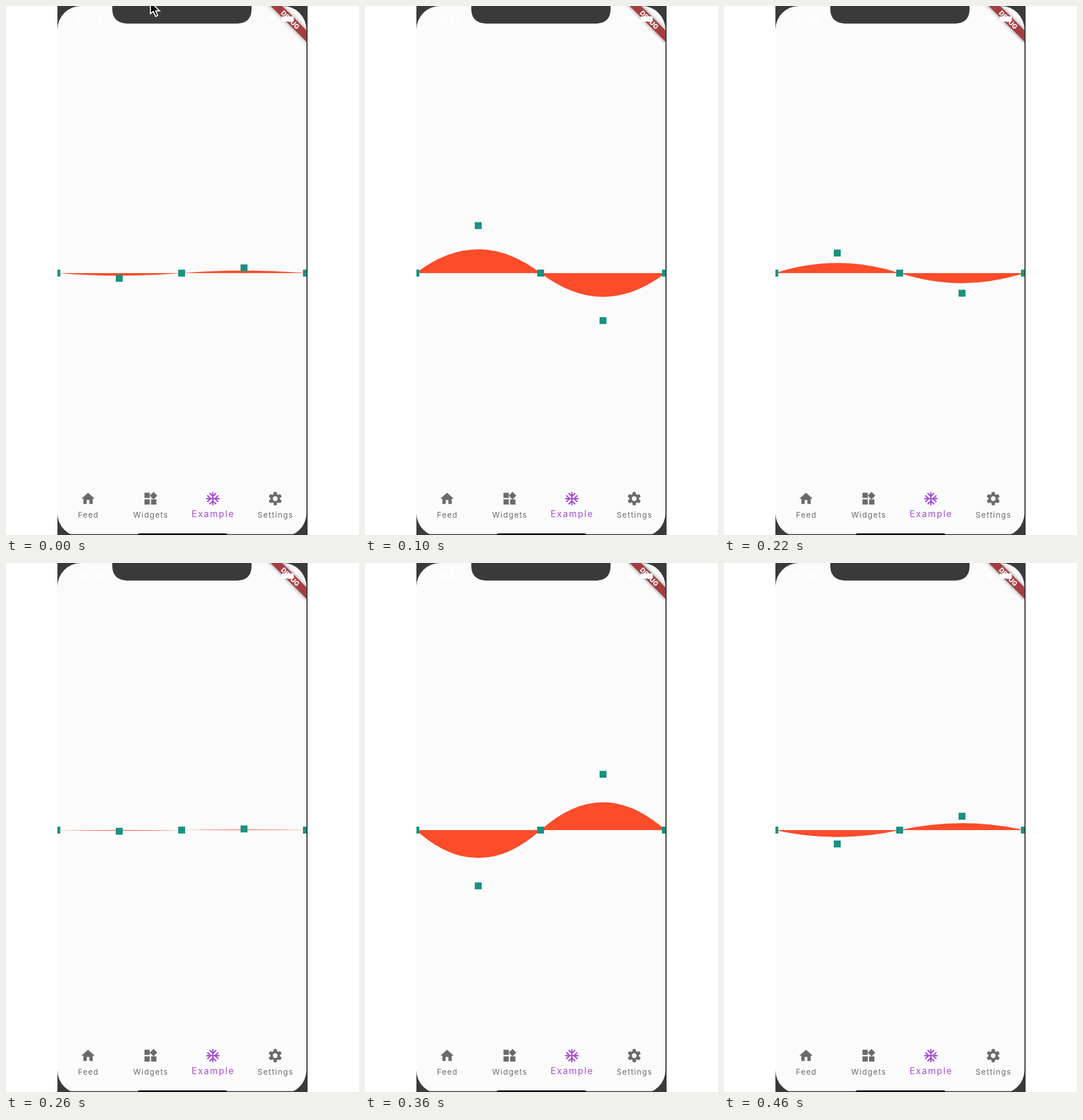
These frames come from a looping animation (611 by 917 pixels, 480 ms). An HTML page:

```html
<!DOCTYPE html>
<html lang="en">
<head>
<meta charset="utf-8">
<title>Wave</title>
<style>
  @property --a { syntax: "<number>"; inherits: true; initial-value: 0; }

  html, body { margin: 0; width: 100%; height: 100%; overflow: hidden; background: #fff; }
  svg { display: block; width: 611px; height: 917px; }
  text { font-family: Inter, "Open Sans", sans-serif; text-anchor: middle; }

  /* The small lead keeps every 20 ms step clear of rounding. */
  .wave, .cursor, .clock text { animation: swing 480ms -1ms infinite; }
  .wave path { transform: scaleY(calc(var(--a) / 100)); }
  .down { transform: translateY(calc(var(--a) * 1px)); }
  .up { transform: translateY(calc(var(--a) * -1px)); }
  .cursor { animation-name: leave; }
  .clock .before { animation-name: before; }
  .clock .after { animation-name: after; }

  @keyframes swing {
    0%      { --a: 9;    animation-timing-function: steps(3); }
    12.5%   { --a: -45;  animation-timing-function: steps(3); }
    25%     { --a: -101; animation-timing-function: steps(1); }
    29.167% { --a: -109; animation-timing-function: steps(1); }
    33.333% { --a: -90;  animation-timing-function: steps(5); }
    54.167% { --a: 2;    animation-timing-function: steps(3); }
    66.667% { --a: 60;   animation-timing-function: steps(3); }
    79.167% { --a: 115;  animation-timing-function: steps(1); }
    83.333% { --a: 98;   animation-timing-function: steps(3); }
    95.833% { --a: 24;   animation-timing-function: steps(1); }
    100%    { --a: 9; }
  }
  @keyframes leave {
    0% { opacity: 1; animation-timing-function: steps(1); }
    4.167%, 100% { opacity: 0; }
  }
  @keyframes before {
    0% { opacity: 1; animation-timing-function: steps(1); }
    62.5%, 100% { opacity: 0; }
  }
  @keyframes after {
    0% { opacity: 0; animation-timing-function: steps(1); }
    62.5%, 100% { opacity: 1; }
  }

  .clock { font-size: 17px; font-weight: 600; fill: #fff; }
  .banner rect { fill: #a53d40; filter: drop-shadow(0 0 3px rgba(0, 0, 0, .5)); }
  .banner text { font-size: 11.5px; font-weight: 800; fill: #fff; }
  .tabs { fill: #6b6b6b; font-size: 13.2px; letter-spacing: 1.4px; }
  .tabs .on { fill: #a550d2; font-size: 15.4px; letter-spacing: 1.8px; }
</style>
</head>
<body>
<svg viewBox="0 0 611 917">
  <defs>
    <clipPath id="screen"><rect x="89" y="0" width="431" height="920" rx="41"/></clipPath>
    <rect id="dot" x="-6" y="-6" width="12" height="12"/>
    <path id="arm" d="M11 12V2h2v4.17l3.24-3.24 1.42 1.41L13 9v3h-2V9L6.34 4.34l1.42-1.41L11 6.17z"/>
    <path id="tooth" d="M9.1 5.7 9.7 2.4q.1-.4.5-.4h3.6q.4 0 .5.4l.6 3.3z"/>
  </defs>

  <rect x="89" width="433" height="917" fill="#3a3a3a"/>

  <g clip-path="url(#screen)">
    <rect x="89" width="431" height="917" fill="#fbfbfb"/>

    <g class="wave" transform="translate(0 463)">
      <path d="M88 0Q196 100 304 0Q412-100 520 0z" fill="#fc4c2a"/>
      <g fill="#1a9282">
        <use href="#dot" x="88"/>
        <use href="#dot" x="304"/>
        <use href="#dot" x="520"/>
        <use class="down" href="#dot" x="196"/>
        <use class="up" href="#dot" x="412"/>
      </g>
    </g>

    <g class="banner" transform="translate(492 24) rotate(45)">
      <rect x="-80" y="-6.9" width="160" height="13.8"/>
      <text y="4.2">DEBUG</text>
    </g>

    <g class="clock">
      <text class="before" x="144" y="28.5">10:39</text>
      <text class="after" x="144" y="28.5">10:40</text>
    </g>
    <rect x="477" y="18" width="21" height="9" rx="2" fill="#fff"/>
    <path d="M452 20q8.500-7 17 0L460.500 29z" fill="#fff"/>

    <g class="tabs">
      <g transform="translate(128.200 840.200) scale(1.15)">
        <path d="M10 20v-6h4v6h5v-8h3L12 3 2 12h3v8z"/>
      </g>
      <text x="142.700" y="887">Feed</text>

      <g transform="translate(236.200 840.200) scale(1.15)">
        <path d="M13 13h8v8h-8zM3 13h8v8H3zM3 3h8v8H3zM16.660 1.690 22.320 7.340 16.660 13 11 7.340z"/>
      </g>
      <text x="250.700" y="887">Widgets</text>

      <g class="on">
        <g transform="translate(344.200 840.200) scale(1.15)">
          <use href="#arm"/>
          <use href="#arm" transform="rotate(90 12 12)"/>
          <use href="#arm" transform="rotate(180 12 12)"/>
          <use href="#arm" transform="rotate(270 12 12)"/>
        </g>
        <text x="358.500" y="886">Example</text>
      </g>

      <g transform="translate(452.200 840.200) scale(1.15)">
        <circle cx="12" cy="12" r="5.400" fill="none" stroke="#6b6b6b" stroke-width="3.600"/>
        <use href="#tooth"/>
        <use href="#tooth" transform="rotate(60 12 12)"/>
        <use href="#tooth" transform="rotate(120 12 12)"/>
        <use href="#tooth" transform="rotate(180 12 12)"/>
        <use href="#tooth" transform="rotate(240 12 12)"/>
        <use href="#tooth" transform="rotate(300 12 12)"/>
      </g>
      <text x="466.500" y="887">Settings</text>
    </g>
  </g>

  <path d="M184 0V5C184 22 194 30.500 212 30.500H398C416 30.500 425 22 425 5V0z" fill="#3a3a3a"/>
  <rect x="89" y="915.500" width="433" height="1.500" fill="#3a3a3a"/>
  <rect x="228" y="914.300" width="155" height="6" rx="3" fill="#000"/>

  <path class="cursor" d="M250-7V13.500L255 9.500 259 18 262.500 16.500 259 8.500H266z"
        fill="#000" stroke="#fff" stroke-width="1.800"/>
</svg>
</body>
</html>
```
